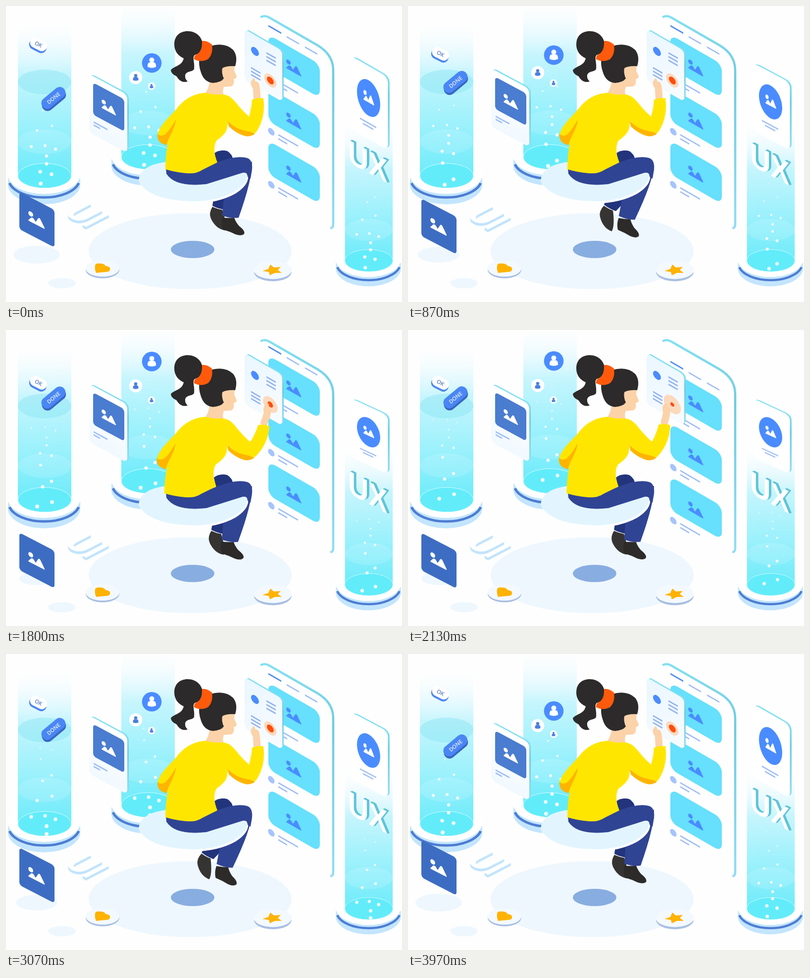
An HTML page that plays this animation: 800x600 px, repeating every 4.01 s.

```html
<!DOCTYPE html>
<html lang="en">
<head>
<meta charset="utf-8">
<title>Interface designer</title>
<style>
html, body { margin: 0; width: 100%; height: 100%; overflow: hidden; background: #fefefe; }
svg { display: block; width: 800px; height: 600px; }
text { font: 600 11px "Open Sans", "Noto Sans", sans-serif; text-anchor: middle; }
.big text { font: bold 66px "Liberation Sans", Arial, sans-serif; text-anchor: start; }
#ui text { font-size: 78px; }
.ln { fill: none; stroke: #9fbdf8; stroke-width: 3; }
</style>
</head>
<body>
<svg viewBox="0 0 800 600">
<defs>
  <linearGradient id="water" gradientUnits="userSpaceOnUse" x1="0" y1="37" x2="0" y2="369">
    <stop offset="0" stop-color="#eefaff" stop-opacity="0"/>
    <stop offset=".3" stop-color="#c6f5fd"/>
    <stop offset=".62" stop-color="#9bf1fc"/>
    <stop offset="1" stop-color="#62e9f9"/>
  </linearGradient>
  <linearGradient id="edge" x1="0" y1="0" x2="0" y2="1">
    <stop offset="0" stop-color="#84e0f2"/><stop offset=".3" stop-color="#6fcbe0"/>
    <stop offset="1" stop-color="#93dcf4"/>
  </linearGradient>
  <linearGradient id="face" x1="0" y1="0" x2="0" y2="1">
    <stop offset="0" stop-color="#fff"/><stop offset="1" stop-color="#f1f9ff"/>
  </linearGradient>
  <linearGradient id="pane" x1="0" y1="0" x2="1" y2="1">
    <stop offset="0" stop-color="#eaf6ff"/><stop offset="1" stop-color="#f8fcff"/>
  </linearGradient>
  <clipPath id="tube"><path d="M24 0H132V344A54 25 0 0 1 24 344Z"/></clipPath>

  <g id="pic">
    <circle cx="5" cy="-16" r="4.8"/>
    <path d="M0 -1Q3 -5 5 -8Q9 -13 13 -7L15 -5L20 -15Q23 -19 26 -13L33 -2Q34 0 31 0H2Q0 0 0 -1Z"/>
  </g>
  <g id="person">
    <circle cy="-6" r="5"/>
    <path d="M-8.5 8Q-9 -1 -4 -1.5H4Q9 -1 8.5 8Q0 12 -8.5 8Z"/>
  </g>
  <g id="item">
    <rect width="104" height="68" rx="14" fill="#66e0fc"/>
    <use href="#pic" transform="translate(36 47) scale(.92)" fill="#4a8cff"/>
    <circle cx="6" cy="86" r="6.6" fill="#a5c4fb"/>
    <path class="ln" d="M20 84H60M20 92H38"/>
  </g>
  <g id="column">
    <path d="M4 349V362A73 40 0 0 0 150 362V349Z" fill="#c3e5fd"/>
    <path d="M7 359A72 38 0 0 0 147 359" fill="none" stroke="#4d7dd3" stroke-width="5"/>
    <ellipse cx="77" cy="342" rx="73" ry="39" fill="#fff"/>
    <g clip-path="url(#tube)">
      <rect x="24" y="37" width="108" height="333" fill="url(#water)"/>
      <ellipse cx="78" cy="275" rx="54" ry="25" fill="#fff" opacity=".13"/>
      <ellipse cx="78" cy="344" rx="54" ry="25" fill="#62ecf9" stroke="#d8fbff"/>
      <g id="bubbles" fill="#fff"></g>
    </g>
  </g>
  <path id="seat" d="M268 355Q270 322 325 316L400 330L487 338Q490 358 462 376Q426 396 378 396Q288 394 268 355Z"/>
</defs>

<!-- floor -->
<g fill="#eef7fe">
  <ellipse cx="372" cy="497" rx="205" ry="77"/>
  <ellipse cx="113" cy="562" rx="28" ry="10.5"/>
  <ellipse id="shade" cx="62" cy="504"/>
</g>
<ellipse cx="377" cy="493.5" rx="44" ry="17.5" fill="#88ade0"/>
<ellipse cx="195" cy="535" rx="34" ry="17" fill="#a9bfe2"/>
<ellipse cx="195" cy="532" rx="34" ry="16.5" fill="#f4f9ff"/>
<path d="M180 526Q181 521 190 522Q199 522 201 527Q212 528 210 535Q209 539 202 539L182 541Q179 534 180 526Z" fill="#ffb200"/>
<ellipse cx="539" cy="539" rx="38" ry="19" fill="#a9bfe2"/>
<ellipse cx="539" cy="535" rx="38.5" ry="18.5" fill="#f4f9ff"/>
<path d="M534 524L541 530L555 529L549 535L557 541L543 541L533 546L531 539L518 537L530 533Z" fill="#ffb200"/>

<use href="#column" transform="translate(209 -38)"/>
<use href="#column"/>
<ellipse cx="78" cy="154" rx="54" ry="25" fill="#7fe0f0" opacity=".4"/>
<use href="#column" transform="translate(662.8 206.4) scale(.9)"/>

<!-- badges in the left column -->
<g id="ok"><g transform="translate(65 79) rotate(27)">
  <rect x="-18" y="-8" width="37" height="21" rx="10.5" fill="#4c86ee"/>
  <rect x="-18" y="-12" width="36" height="21" rx="10.5" fill="#fff"/>
  <text y="2.5" fill="#5c7fc4">OK</text>
</g></g>
<g id="done"><g transform="translate(96 188) rotate(-40)">
  <rect x="-29" y="-9" width="56" height="23" rx="11" fill="#3a66c2"/>
  <rect x="-27" y="-13" width="56" height="23" rx="11" fill="#4a86f5"/>
  <text x="1" y="3" fill="#e6f0ff">DONE</text>
</g></g>

<!-- people in the middle column -->
<g id="user1"><g transform="translate(294.5 115.5)">
  <circle r="19.8" fill="#4a8cff"/><use href="#person" fill="#fff"/>
</g></g>
<g id="user2"><g transform="translate(262 145)">
  <circle r="13.3" fill="#fff"/><use href="#person" transform="scale(.65)" fill="#4a80e0"/>
</g></g>
<g id="user3"><g transform="translate(294 162.5)">
  <circle r="7.5" fill="#fff"/><use href="#person" transform="scale(.42)" fill="#4a80e0"/>
</g></g>

<!-- left photo card -->
<g id="card"><g transform="matrix(1 .54 0 1 168 138)">
  <rect x="3" y="-3" width="77" height="119" rx="9" fill="url(#edge)"/>
  <rect width="77" height="118" rx="9" fill="url(#face)"/>
  <rect x="8" y="13" width="63" height="65" rx="6" fill="#4a7cd0"/>
  <use href="#pic" transform="translate(25 55) scale(.88)" fill="#fff"/>
  <path class="ln" d="M9 92.5H37M9 98.5H22"/>
</g></g>

<!-- dark photo card and flat lettering -->
<g id="photo"><g transform="matrix(1 .52 0 1 27 376.5)">
  <rect width="71" height="76" rx="6" fill="#3d6dc2"/>
  <use href="#pic" transform="translate(18 49)" fill="#fff"/>
</g></g>
<g id="ui" class="big"></g>

<!-- tall screen -->
<path d="M516 22Q523 18 533 24L630 80Q661 99 661 130V442Q661 449 657 450" fill="#fefefe" stroke="url(#edge)" stroke-width="4.5" stroke-linecap="round"/>
<g id="list"><g transform="matrix(1 .577 0 1 530 58)">
  <path class="ln" d="M37 -17H62M74 -17.5H99"/>
  <path class="ln" style="stroke:#4a86f7" d="M0 -18H26"/>
  <use href="#item"/><use href="#item" y="107.5"/><use href="#item" y="215"/>
</g></g>

<!-- floating pane -->
<g transform="matrix(1 .577 0 1 482 47)">
  <rect x="3" y="-3" width="76" height="103" rx="8" fill="url(#edge)"/>
  <rect width="76" height="103" rx="8" fill="url(#pane)"/>
  <circle cx="21" cy="33" r="8" fill="#4a8cff"/>
  <path class="ln" style="stroke:#8fb1f3" d="M44 22.5H63M44 30H63M44 37.5H63M13 70.5H32M13 77.5H32M13 84.5H32"/>
  <circle id="halo" cx="52" cy="74" fill="#fcd9bd"/>
  <circle id="dot" cx="52" cy="74" fill="#ff4c0c"/>
</g>

<!-- right card and lettering -->
<g id="badge"><g transform="matrix(1 .58 0 1 697 100)">
  <rect x="3" y="-2" width="75" height="148" rx="11" fill="url(#edge)"/>
  <rect y="1" width="74.5" height="148" rx="11" fill="#fff"/>
  <ellipse cx="35.5" cy="66" rx="23.5" ry="36" fill="#4a8cff"/>
  <use href="#pic" transform="translate(25 75) scale(.66 1)" fill="#fff"/>
  <path class="ln" d="M18 117H51M24 124H45"/>
</g></g>
<g id="ux" class="big"></g>

<!-- woman -->
<g id="farLeg">
  <path d="M425 350H482L443 413Q428 411 417 405Z" fill="#22347c"/>
  <path d="M417 407Q409 420 414 431Q424 452 443 455Q447 443 437 413Q428 412 417 407Z" fill="#363333"/>
</g>
<g id="nearLeg">
  <path d="M437 429Q434 441 438 453Q452 457 464 463Q476 467 481 462Q484 456 471 446Q464 438 461 429Q448 430 437 429Z" fill="#2d2a2a"/>
  <path d="M430 330L445 314L497 316Q498 350 470 429Q455 431 437 425L440 385Z" fill="#304494"/>
</g>
<use href="#seat" fill="#fff" transform="translate(2 4)"/>
<use href="#seat" fill="#e2f5fe"/>
<path d="M420 299Q432 290 447 294Q457 300 459 312L425 322Z" fill="#22347c"/>
<path d="M323 328L380 335L427 317Q465 302 487 308Q499 312 497 332L494 350L488 346Q488 336 478 338Q440 350 405 361Q342 368 324 340Z" fill="#304494"/>
<path d="M436 123L462 120L461 131L466 143Q466 147 460 148Q462 160 455 163L440 164Q436 176 441 182Q420 192 402 178Q411 165 411 150Z" fill="#fcd2a9"/>
<g id="forearm">
  <path id="hand" d="M500 190L499 168Q493 158 495 153L499 147Q503 146 503 152L510 155Q515 166 514 194Z" fill="#fcd2a9"/>
  <path d="M497 190Q508 185 520 187Q525 222 509 250Q502 263 488 264Q470 250 491 224Q496 207 497 190Z" fill="#ffe600"/>
</g>
<g id="body">
  <path d="M404 176C380 177 360 188 345 208C328 227 306 246 306 265Q310 277 326 280L328 272Q322 300 322 331Q342 337 364 339Q384 341 397 332L427 317Q416 290 425 273Q447 258 447 244L449 233Q465 255 491 262L500 232Q480 216 462 193Q450 179 436 179Q420 181 404 176Z" fill="#ffe600"/>
  <path d="M306 259Q304 278 324 282L329 268Q343 242 343 230Q333 249 322 260Q312 266 306 259Z" fill="#ffb400"/>
  <path d="M448 233Q462 248 480 252Q496 255 503 259Q495 265 485 264Q467 260 450 244Z" fill="#ffb400"/>
</g>
<g fill="#2c2a2a">
  <path d="M340 78C340 60 352 51 367 51C385 51 397 64 397 78C397 92 390 97 382 99C375 103 382 114 380 128C377 134 365 131 362 140Q361 148 367 153C354 157 348 148 345 143C341 140 334 138 333 130C338 122 356 122 359 106C348 101 340 92 340 78Z"/>
  <path d="M413 81Q442 73 459 89Q469 102 463 122Q446 121 437 126Q435 136 440 147Q434 155 418 156Q400 154 394 135Q388 118 391 106Z"/>
</g>
<path d="M396 71Q405 69 416 78Q419 97 408 108Q394 115 380 108Q379 101 385 98Q397 92 396 71Z" fill="#ff5a0c"/>
</svg>
<script>
const LOOP = 4010, RISE = 192;
const el = id => document.getElementById(id);
const NS = "http://www.w3.org/2000/svg";
const add = (parent, tag, attrs) => {
  const node = parent.appendChild(document.createElementNS(NS, tag));
  set(node, attrs);
  return node;
};
function set(node, attrs) {
  for (const key in attrs) node.setAttribute(key, attrs[key]);
}
const shift = (id, y) => set(el(id), { transform: `translate(0 ${y})` });
const clamp = v => Math.max(0, Math.min(1, v));
const wave = x => (1 - Math.cos(Math.PI * x)) / 2;

// eased value through [time, value] pairs
function keys(t, ...points) {
  let [from, value] = points[0];
  for (const [to, next] of points.slice(1)) {
    value += (next - value) * wave(clamp((t - from) / (to - from)));
    from = to;
  }
  return value;
}

// white letters on a coloured side that runs along dx, dy
function extrude(id, word, plane, x, y, dx, dy, side) {
  for (let depth = 5; depth >= 0; depth--) {
    const transform = `matrix(${plane} ${x + depth * dx} ${y + depth * dy})`;
    add(el(id), "text", { transform, fill: depth ? side : "#fff" }).textContent = word;
  }
}
extrude("ux", "UX", ".87 .47 0 1", 691, 316, 1, -.3, "#5fc4d8");
extrude("ui", "UI", ".64 .38 -.87 .45", 115, 420, 0, 1.1, "#c2e4fc");

// x and starting height of each bubble; every one rises by RISE per loop
const seeds = [
  [51, 285], [79, 283], [100, 290], [82, 320], [69, 336], [92, 341], [70, 360],
  [63, 252], [93, 243], [82, 304], [74, 212], [92, 201]
];
const bubbles = seeds.flatMap(([x, y]) => [0, 1, 2].map(turn => (
  { y: y + (1 - turn) * RISE, node: add(el("bubbles"), "circle", { cx: x }) }
)));

function draw(t) {
  const half = 1 - Math.abs(1 - 2 * t / LOOP);
  const even = wave(half), early = wave(half ** .62), late = wave(half ** 1.2);
  const firm = half ** 3 * (10 - 15 * half + 6 * half * half);
  const swing = wave(4 * t / LOOP);

  shift("ok", 29.5 * early);
  shift("done", -50 * early);
  shift("user1", -53.5 * late);
  shift("user2", -33 * late);
  shift("user3", -21 * late);
  shift("card", -29.5 * even);
  shift("photo", 35 * even);
  shift("ui", 14 * firm);
  shift("ux", 14 * firm);
  set(el("shade"), { rx: 47 - 12 * even, ry: 18 - 5 * even });
  set(el("badge"), { transform: `translate(0 290) scale(1 ${1 - .2 * firm}) translate(0 -290)` });

  set(el("farLeg"), { transform: `rotate(${12 * swing} 418 300)` });
  set(el("nearLeg"), { transform: `rotate(${6.3 * swing} 425 320)` });

  const reach = keys(t, [1050, 0], [1480, 1], [2000, 1], [2400, 0]);
  set(el("forearm"), { transform: `rotate(${14 * reach} 493 242)` });
  set(el("hand"), { transform: `translate(0 ${-3 * reach}) rotate(${8 * reach} 508 190)` });
  set(el("body"), { transform: `translate(0 178) skewX(${-.9 * reach}) translate(0 -178)` });
  shift("list", keys(t, [1500, 0], [1660, -17], [2080, 25], [2480, 0]));

  const press = keys(t, [1530, 0], [2090, 1], [2420, 0]);
  set(el("halo"), { r: 12.5 + 5 * press });
  set(el("dot"), { r: 7 - 3.3 * press });

  for (const b of bubbles) {
    const y = b.y - RISE * t / LOOP;
    set(b.node, {
      cy: y,
      r: 1.2 + 2.8 * clamp((y - 150) / 210),
      opacity: .9 * clamp((y - 130) / 110)
    });
  }
}

function tick(now) {
  draw(now % LOOP);
  requestAnimationFrame(tick);
}
draw(0);
requestAnimationFrame(tick);
</script>
</body>
</html>
```
